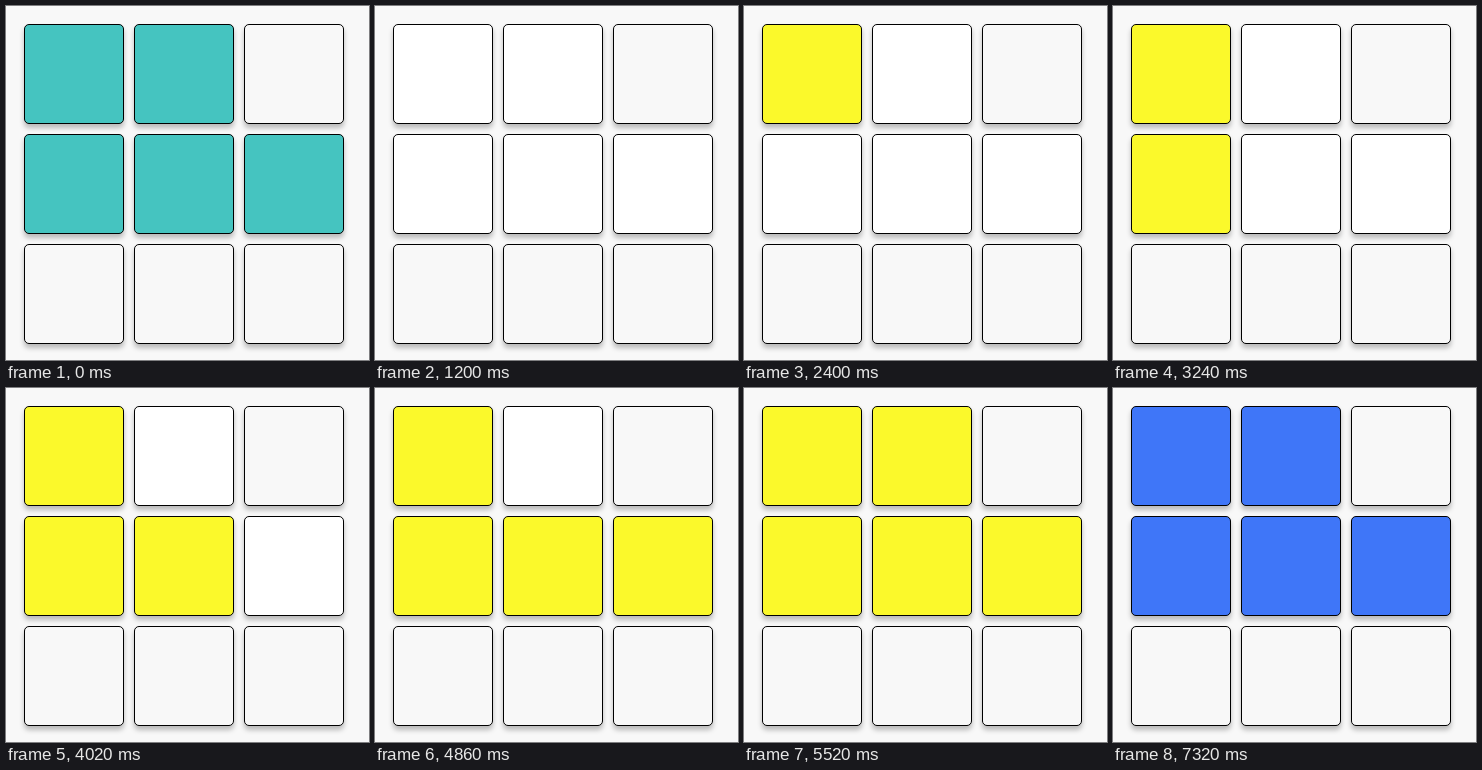
Animation of 363x354 px, one loop 8640 ms. Source, as an HTML page:

```html
<!DOCTYPE html>
<html lang="en">
<head>
<meta charset="utf-8">
<title>Colour grid</title>
<style>
  html, body { margin: 0; width: 100%; height: 100%; overflow: hidden; background: #f8f8f8; }
  #grid {
    position: absolute; left: 18px; top: 18px;
    display: grid; grid-template: repeat(3, 100px) / repeat(3, 100px); gap: 10px;
  }
  #grid div {
    box-sizing: border-box; border: 1px solid #000; border-radius: 5px;
    background: #f8f8f8; box-shadow: 0 4px 5px rgba(0, 0, 0, .25);
  }
</style>
</head>
<body>
<div id="grid"></div>
<script>
const LOOP = 8640, CLEAR = 1200, FINISH = 7320;
const TEAL = '#45c4c0', WHITE = '#fff', YELLOW = '#fbf92b', BLUE = '#3f76f8';
// Cell index -> time it turns yellow
const clicks = { 0: 2400, 3: 3240, 4: 4020, 5: 4860, 1: 5520 };

const grid = document.getElementById('grid');
const cells = Array.from({ length: 9 }, () => grid.appendChild(document.createElement('div')));

function colorAt(t, click) {
  if (t < CLEAR) return TEAL;
  if (t >= FINISH) return BLUE;
  return t < click ? WHITE : YELLOW;
}

function draw(now) {
  const t = now % LOOP;
  for (const i in clicks) cells[i].style.background = colorAt(t, clicks[i]);
}

const start = performance.now();
function tick() {
  draw(performance.now() - start);
  requestAnimationFrame(tick);
}
tick();
</script>
</body>
</html>
```
